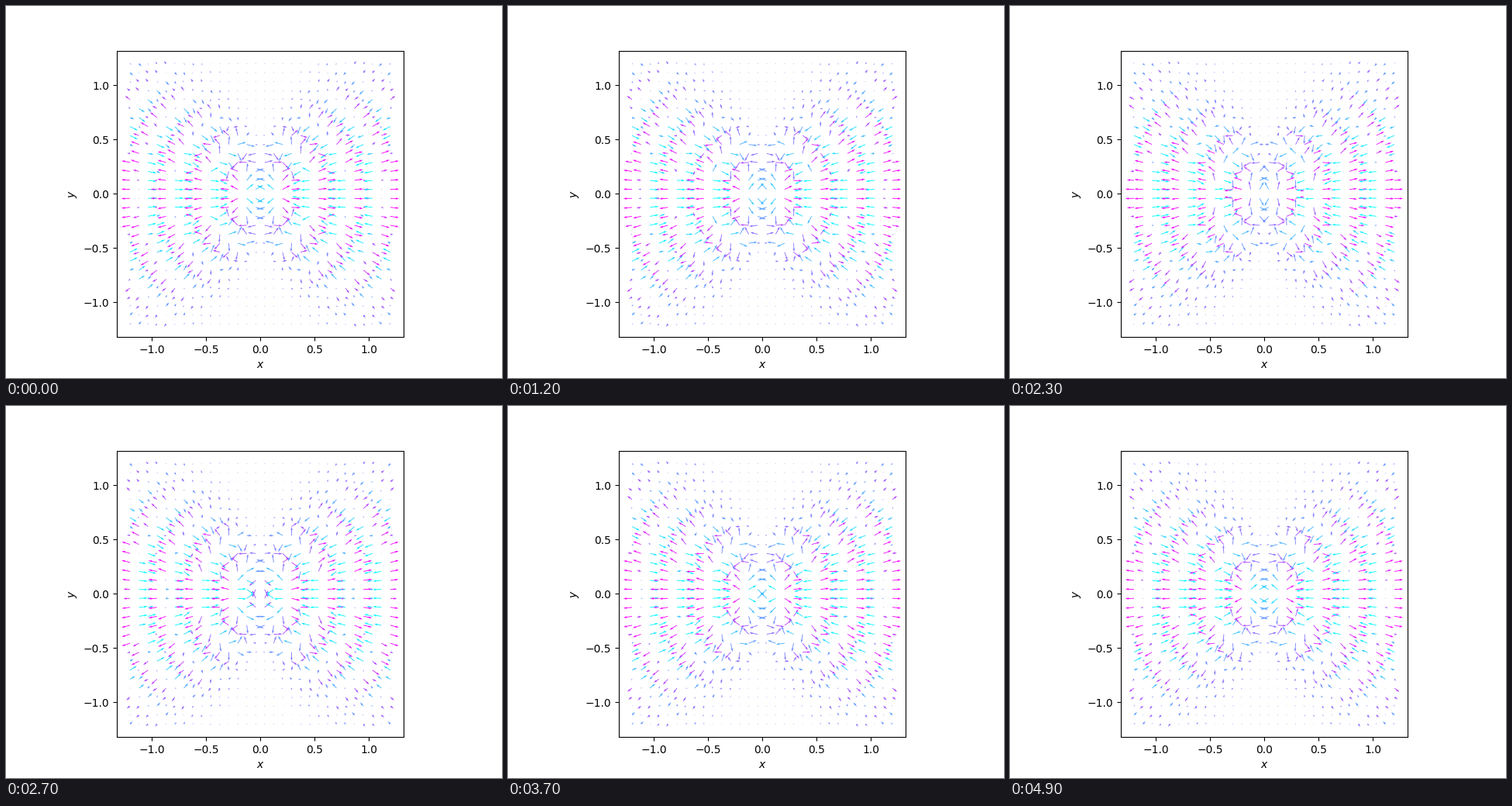
Recreate the animation shown at these times as a matplotlib script. Size 640 by 480 pixels, loop 5 s.

```python
import numpy as np
import matplotlib.pyplot as plt
from matplotlib.animation import FuncAnimation

FRAMES = 50
CYCLES = 4            # flux oscillations per loop
WAVELENGTH = 0.6      # of the dipole field; the flux pattern repeats at half of it
CLIP = 0.4            # flux magnitude at which arrows reach full length

axis = np.linspace(-1.2, 1.2, 30)
X, Y = np.meshgrid(axis, axis)
R = np.hypot(X, Y)
sin_t, cos_t = X / R, Y / R
q = 2 * np.pi / WAVELENGTH * R

# Oscillating part of the energy flux around a vertical dipole, near field included
near = 1 + 1j / q
carrier = np.exp(2j * q) / R**2
flux_r = sin_t**2 * near * (near - 1 / q**2) * carrier
flux_t = 2 * sin_t * cos_t * (-1j / q) * near**2 * carrier


def field(i):
    """Clipped arrow components and colour values of frame i."""
    turn = np.exp(-2j * np.pi * CYCLES * i / (FRAMES - 1))
    s_r, s_t = (flux_r * turn).real, (flux_t * turn).real
    u = s_r * sin_t + s_t * cos_t
    v = s_r * cos_t - s_t * sin_t
    limit = np.maximum(np.hypot(u, v), CLIP)
    u, v = u / limit, v / limit
    return u, v, u * sin_t


fig, ax = plt.subplots(figsize=(6.4, 4.8), dpi=100)
ax.set_aspect("equal")
ax.set_xlim(-1.32, 1.32)
ax.set_ylim(-1.32, 1.32)
ax.set_xticks(np.arange(-1, 1.1, 0.5))
ax.set_yticks(np.arange(-1, 1.1, 0.5))
ax.set_xlabel("$x$")
ax.set_ylabel("$y$")
arrows = ax.quiver(X, Y, *field(0), cmap="cool", scale=33)
arrows.set_clim(-1, 1)


def update(i):
    arrows.set_UVC(*field(i))
    return (arrows,)


anim = FuncAnimation(fig, update, frames=FRAMES, interval=100, repeat=True)
plt.show()
```
